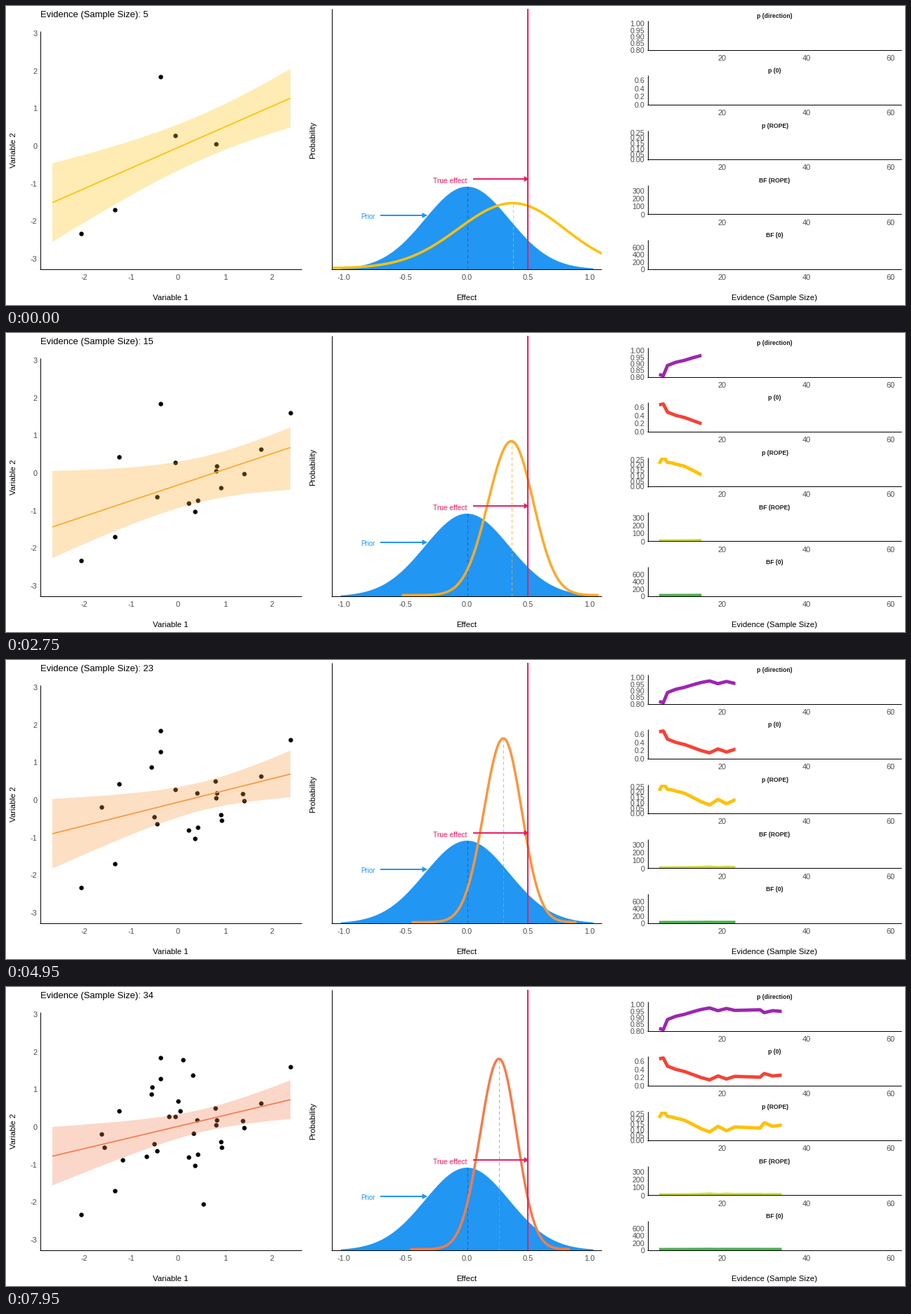
Animation, 1280 px wide and 427 px high, one loop 8 s. Source, as a matplotlib script:

```python
import math
import numpy as np
import matplotlib.pyplot as plt
from matplotlib.animation import FuncAnimation
from matplotlib.patches import Polygon, Rectangle

W, H, DPI = 1280, 427, 64
FRAMES, INTERVAL = 160, 50
PT = 72 / DPI
N0, STEP = 5, 11 / 60          # first sample size, samples per frame

plt.rcParams["font.family"] = "Liberation Sans"
BLUE, PINK, GREY = "#2196F3", "#E91E63", "#4D4D4D"

fig = plt.figure(figsize=(W / DPI, H / DPI), dpi=DPI, facecolor="white")
ax = fig.add_axes([0, 0, 1, 1])
ax.set(xlim=(0, W), ylim=(H, 0))
ax.axis("off")


def text(x, y, s, size=11, color="black", ha="center", va="baseline", **kw):
    return ax.text(x, y, s, size=size * PT, color=color, ha=ha, va=va, **kw)


def line(xs, ys, color, width, z=3, **kw):
    kw.setdefault("solid_capstyle", "butt")
    return ax.plot(xs, ys, color=color, lw=width * PT, zorder=z, **kw)[0]


def frame_axes(x0, x1, y0, y1):
    line([x0, x0], [y0, y1 + .5], "black", 1, 9)
    line([x0 - .5, x1], [y1, y1], "black", 1, 9)


def clip_box(x0, x1, y0, y1):
    return Rectangle((x0, y0), x1 - x0, y1 - y0, transform=ax.transData)


def arrow(x0, x1, y, color):
    line([x0, x1 - 4], [y, y], color, 2, 7)
    head = [(x1, y), (x1 - 7.5, y - 4), (x1 - 7.5, y + 4)]
    ax.add_patch(Polygon(head, fc=color, ec="none", zorder=7))


# How the model looks at a few sample sizes; everything between is blended.
KEYS = [5, 10.87, 15.08, 20.4, 26.08, 29.57, 34.15]
MODEL = dict(
    mode=[.377, .315, .364, .313, .284, .267, .263],
    peak=[94, 203, 221, 252, 276, 234, 273],
    level=[202, 204, 217, 206, 200, 203, 199],
    slope=[.44, .28, .335, .295, .205, .19, .238],
    band_slope=[.44, .28, .235, .295, .205, .30, .238],
    flare=[.215, .21, .25, .21, .215, .29, .18])


def model(n, name):
    return np.interp(n, KEYS, MODEL[name])


def fit_color(n):
    stops = [5, 19.6, 34.2]
    rgb = [(255, 193, 7), (250, 160, 56), (244, 124, 76)]
    return [np.interp(n, stops, c) / 255 for c in zip(*rgb)]


# ---- scatter and regression ----
BASE = 375.5
frame_axes(48.5, 421, 36, BASE)
for v in range(-3, 4):
    text(44.5, 204 - 53.6 * v, str(v), color=GREY, ha="right")
for v in range(-2, 3):
    text(245 + 66.9 * v, 391, str(v), color=GREY)
text(234.5, 420, "Variable 1", 11.4)
text(11.5, 206, "Variable 2", 11.4, rotation=90, va="center")
title = text(49, 16, "", 13.05, ha="left")

# Observations in the order they arrive.
POINTS = np.array([
    (107, 325), (155, 291), (220, 101), (241, 185), (299, 197),
    (339, 201), (405, 114), (161, 177), (363, 166), (306, 221),
    (300, 190), (269, 255), (215, 234), (260, 243), (273, 239),
    (211, 224), (298, 173), (220, 131), (136, 210), (272, 190),
    (337, 191), (207, 153), (307, 229), (200, 242), (245, 163),
    (267, 209), (248, 177), (266, 126), (252, 104), (281, 310),
    (166, 247), (140, 229), (208, 143), (232, 185)])
dots = ax.scatter([], [], s=(6.4 * PT) ** 2, c="black", lw=0, zorder=2)

FIT_X = np.linspace(66, 405, 12)
band = Polygon([(0, 0), (0, 1)], alpha=.3, lw=0, zorder=3)
ax.add_patch(band)
fit = line([], [], "black", 1.7, 4)

# ---- prior and posterior ----


def effect_x(v):
    return 656 + 174.6 * np.asarray(v)


frame_axes(463.5, 848, 4, BASE)
for v in np.arange(-1, 1.1, .5):
    text(effect_x(v), 391, f"{v:.1f}", color=GREY)
text(655.5, 420, "Effect", 11.4)
text(437.5, 191, "Probability", 11.4, rotation=90, va="center")

b = np.linspace(-1.03, 1.03, 200)
ax.fill_between(effect_x(b), BASE, BASE - 118 * np.exp(-b ** 2 / .236),
                color=BLUE, lw=0, zorder=2)
DASH = dict(dashes=(4 * PT, 3.2 * PT))
line([656.5] * 2, [BASE, 258], "#5A46A8", 1, 3, **DASH)
dash = line([], [], "black", 1, 3, alpha=.8, **DASH)
curve = line([], [], "black", 3.5, 4, solid_joinstyle="round")
curve.set_clip_path(clip_box(464, 848, 4, 377))
line([743] * 2, [4, BASE], PINK, 2, 6)
arrow(665, 745, 247, PINK)
arrow(533, 600, 299, BLUE)
text(632.5, 253, "True effect", 10.2, PINK)
text(515, 304, "Prior", 9.8, BLUE)


# ---- indices by sample size, all driven by p (0) ----
sizes = np.arange(5, 36)
p_zero = np.interp(
    sizes,
    [5, 6, 7, 9, 11, 15, 17, 19, 21, 23, 29, 30, 32, 34],
    [.66, .68, .48, .4, .35, .2, .145, .24, .165, .23, .21, .3, .24, .26])
z = np.sqrt(-2 * np.log(p_zero))
p_dir = np.array([(1 + math.erf(v / math.sqrt(2))) / 2 for v in z])
p_rope = p_zero * (.55 - .23 * np.exp((5 - sizes) / 2))

# name, values, colour, ticks, tick format, pixels from first to last tick
PANELS = [
    ("p (direction)", p_dir, "#9C27B0",
     np.linspace(.8, 1, 5), "{:.2f}", 37.5),
    ("p (0)", p_zero, "#F44336", np.linspace(0, .6, 4), "{:.1f}", 35),
    ("p (ROPE)", p_rope, "#FFC107",
     np.linspace(0, .25, 6), "{:.2f}", 38.5),
    ("BF (ROPE)", 1.2 / p_rope, "#CDDC39",
     np.linspace(0, 300, 4), "{:.0f}", 34),
    ("BF (0)", 15 + 1 / p_zero, "#4CAF50",
     np.linspace(0, 600, 4), "{:.0f}", 30.5)]


def size_x(n):
    return 1019.7 + (np.asarray(n) - 20) * 5.9875


traces = []
for k, (name, vals, color, ticks, fmt, span) in enumerate(PANELS):
    bottom = 62.5 + 78.25 * k
    top = bottom - 41.5
    frame_axes(913.5, 1275, top, bottom)
    text(1094.5, top - 4, name, 8.6, "#1A1A1A", weight="bold")

    def to_y(v):
        return bottom + .3 - span * (v - ticks[0]) / (ticks[-1] - ticks[0])

    for v in ticks:
        text(909.5, to_y(v) + 4, fmt.format(v), 10.8, GREY, ha="right")
    for v in (20, 40, 60):
        text(size_x(v), bottom + 15.3, str(v), color=GREY)
    trace = line([], [], color, 4.8, 5, solid_joinstyle="round")
    trace.set_clip_path(clip_box(914, 1275, top, bottom + 1))
    traces.append((trace, to_y(vals)))
text(1094, 420, "Evidence (Sample Size)", 11.4)


def draw(i):
    n = N0 + i * STEP
    color = fit_color(n)
    title.set_text(f"Evidence (Sample Size): {round(n)}")
    dots.set_offsets(POINTS[:int(n)] + .3)

    # straight fit inside a band that narrows around its waist
    dx = FIT_X - 245
    level = model(n, "level")
    fit.set_data(FIT_X, level - model(n, "slope") * dx)
    mid = level - model(n, "band_slope") * dx
    waist = np.interp(n, [5, 15, 26, 34], [32, 32, 16, 16])
    half = np.hypot(waist, model(n, "flare") * (FIT_X - 280))
    band.set_xy(np.r_[np.c_[FIT_X, mid - half],
                      np.c_[FIT_X, mid + half][::-1]])
    band.set_facecolor(color)

    # bell of constant area, slightly heavier on the left
    mode, peak = model(n, "mode"), model(n, "peak")
    sd = 40.3 / peak
    v = np.linspace(mode - 4.9 * sd, mode + 3.9 * sd, 160)
    side = np.where(v < mode, 1.04, .98) * sd
    bell = np.exp(-((v - mode) / side) ** 2 / 2)
    curve.set_data(effect_x(v), BASE - 1 - (peak - 1) * bell)
    dash.set_data([effect_x(mode)] * 2, [BASE, BASE - peak])
    for art in (fit, curve, dash):
        art.set_color(color)

    shown = np.r_[sizes[sizes < n], n]
    for trace, ys in traces:
        trace.set_data(size_x(shown), np.interp(shown, sizes, ys))
    return []


anim = FuncAnimation(fig, draw, frames=FRAMES, interval=INTERVAL,
                     init_func=lambda: draw(0), repeat=True, repeat_delay=0)
plt.show()
```
